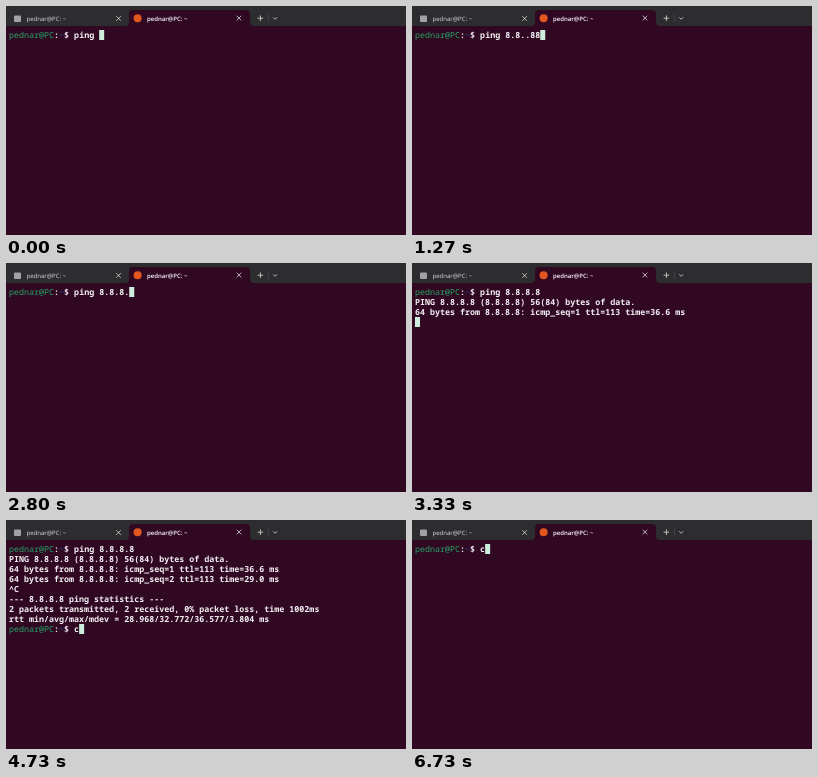
Recreate the animation shown at these times as an HTML page. Size 400 px wide and 229 px high, loop 8000 ms.

```html
<!DOCTYPE html>
<html lang="en">
<head>
<meta charset="utf-8">
<title>Terminal ping</title>
<style>
  html, body { margin: 0; width: 100%; height: 100%; overflow: hidden; background: #300822; }
  svg { display: block; width: 100vw; height: 100vh; }
  text { white-space: pre; text-rendering: geometricPrecision; }
  .mono { font: 600 8.35px "Noto Sans Mono", "DejaVu Sans Mono", monospace; fill: #f4f0f3; }
  .user { font-weight: 500; fill: #26a269; }
  .path { fill: #12488b; }
  .title { font: 500 6px "Open Sans", "Noto Sans", sans-serif; fill: #dededf; }
  .title.active { font-weight: 600; fill: #fff; }
  .glyph { fill: none; stroke: #dcdcdc; stroke-width: .8; }
</style>
</head>
<body>
<svg viewBox="0 0 400 229" preserveAspectRatio="none">
  <rect width="400" height="229" fill="#300822"/>
  <rect width="400" height="20" fill="#2d2d30"/>
  <path d="M119 20q4 0 4-4V8q0-4 4-4H240q4 0 4 4v8q0 4 4 4z" fill="#300822"/>
  <rect x="8" y="9.5" width="7" height="6.5" rx="1" fill="#a2a2a5"/>
  <circle cx="131.6" cy="12.2" r="4" fill="#e2571f"/>
  <text class="title" x="20.5" y="14.8"></text>
  <text class="title active" x="141" y="14.8"></text>
  <g class="glyph">
    <path d="M110.3 10.2l4.6 4.6m0-4.6l-4.6 4.6"/>
    <path d="M230.7 9.8l4.6 4.6m0-4.6l-4.6 4.6"/>
    <path d="M251.6 12.2h5.6m-2.8-2.8v5.6"/>
    <path d="M267.2 11.3l2 2 2-2"/>
    <path d="M262.3 8v8" stroke="#4a4a4d"/>
  </g>
  <rect id="cursor" width="5" height="10" fill="#cdeedd"/>
  <g id="screen"></g>
</svg>
<script>
const LOOP = 8000, LEFT = 3, TOP = 24, CELL = 5.01, ROW = 10;
const USER = "pednar@PC", PROMPT = USER + ":~$ ";
const screenGroup = document.getElementById("screen");
const cursor = document.getElementById("cursor");
document.querySelectorAll(".title").forEach(t => t.textContent = USER + ": ~");

const typed = command => [PROMPT + command];
const reply = (seq, time) => `64 bytes from 8.8.8.8: icmp_seq=${seq} ttl=113 time=${time} ms`;
const started = [
  ...typed("ping 8.8.8.8"),
  "PING 8.8.8.8 (8.8.8.8) 56(84) bytes of data.",
  reply(1, "36.6")
];
const replied = [...started, reply(2, "29.0")];
const finished = [
  ...replied,
  "^C",
  "--- 8.8.8.8 ping statistics ---",
  "2 packets transmitted, 2 received, 0% packet loss, time 1002ms",
  "rtt min/avg/max/mdev = 28.968/32.772/36.577/3.804 ms"
];

// [start in ms, lines, cursor hidden]; the cursor sits after the last line
const steps = [
  [0, typed("ping ")],
  [600, typed("ping 8")],
  [670, typed("ping 8.")],
  [870, typed("ping 8.8")],
  [930, typed("ping 8.8.")],
  [1070, typed("ping 8.8..8")],
  [1270, typed("ping 8.8..88")],
  [1600, typed("ping 8.8..8")],
  [1730, typed("ping 8.8..")],
  [1930, typed("ping 8.8.")],
  [2530, typed("ping 8.8.8")],
  [2730, typed("ping 8.8.8.")],
  [2870, typed("ping 8.8.8.8")],
  [3330, [...started, ""]],
  [3930, [...started, ""], true],
  [4330, [...replied, ""]],
  [4470, [...finished, PROMPT]],
  [4730, [...finished, PROMPT + "c"]],
  [5200, typed("c")],
  [6000, typed("c"), true],
  [6730, typed("c")]
];

function addText(content, column, row, style = "") {
  const text = document.createElementNS("http://www.w3.org/2000/svg", "text");
  text.setAttribute("class", "mono " + style);
  text.setAttribute("x", LEFT + column * CELL);
  text.setAttribute("y", TOP + row * ROW + 8.1);
  text.textContent = content;
  screenGroup.append(text);
}

function drawLine(line, row) {
  if (!line.startsWith(PROMPT)) return addText(line, 0, row);
  const n = USER.length;
  addText(USER, 0, row, "user");
  addText(":", n, row);
  addText("~", n + 1, row, "path");
  addText(line.slice(n + 2), n + 2, row);
}

function show([, lines, hidden]) {
  screenGroup.replaceChildren();
  lines.forEach(drawLine);
  const row = lines.length - 1;
  cursor.setAttribute("x", LEFT + lines[row].length * CELL);
  cursor.setAttribute("y", TOP + row * ROW);
  cursor.setAttribute("visibility", hidden ? "hidden" : "visible");
}

let shown;
function tick() {
  const time = performance.now() % LOOP;
  const step = steps.findLast(([start]) => start <= time);
  if (step !== shown) show(shown = step);
  requestAnimationFrame(tick);
}
tick();
</script>
</body>
</html>
```
